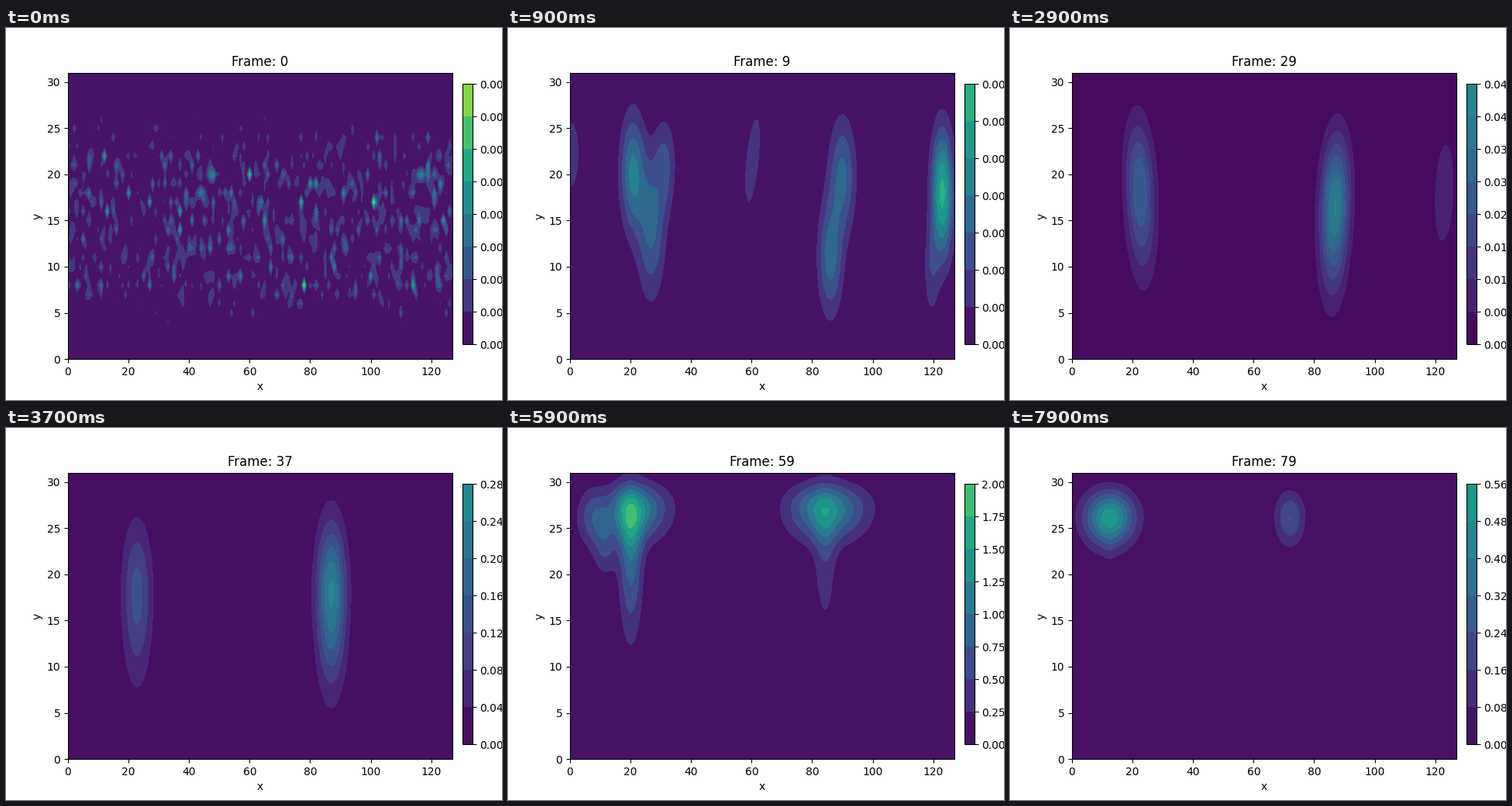
A matplotlib script for the animation above (8 s loop, 640 by 480 pixels).

```python
import matplotlib.pyplot as plt
import numpy as np
from matplotlib.animation import FuncAnimation

NX, NY, FRAMES = 128, 32, 80
STAGES = 9, 21, 37, 46, 59, 79
X, Y = np.meshgrid(np.arange(NX), np.arange(NY))
KX, KY = np.meshgrid(np.fft.fftfreq(NX), np.fft.fftfreq(NY))

# White noise held inside a central band of y
rng = np.random.default_rng(4)
BAND = np.exp(-((Y - 15.2) / 11.5) ** 4)
SPECTRUM = np.fft.fft2(rng.normal(size=(NY, NX)) * BAND)


def ramp(t, start, end):
    return np.clip((t - start) / (end - start), 0, 1)


def smooth(u):
    return u * u * (3 - 2 * u)


def level(t, values, stages=STAGES):
    """Exponential growth or decay between stages."""
    return np.exp(np.interp(t, stages, np.log(values)))


def bump(x, y, sx, up, down, lean=0, skew=0):
    """Gaussian lobe with its own height above and below the centre."""
    dy = Y - y
    dx = X - x - lean * dy
    wx = sx * (1 + skew * np.sign(dx))
    wy = np.where(dy > 0, up, down)
    return np.exp(-0.5 * ((dx / wx) ** 2 + (dy / wy) ** 2))


def noise(n):
    sx, sy = 0.35 * n, 0.45 * n
    blur = np.exp(-2 * np.pi ** 2 * ((sx * KX) ** 2 + (sy * KY) ** 2))
    z = np.abs(np.fft.ifft2(SPECTRUM * blur).real) ** 1.7
    return 7.7e-4 * np.exp(-0.1 * n) * z / z.max()


def plume(t, x, y, shift, drift, lean, skew, stem, head, width):
    """A column that lengthens, then rises into a wide head and fades."""
    young = ramp(t, 9, 37) ** 0.7
    birth = ramp(t, 37, 46)
    late, fade = ramp(t, 46, 59), ramp(t, 59, 79)
    rise = smooth(birth)

    x = x + shift * young - 2.7 * late - drift * fade
    y = y + (18 - y) * young + 3.8 * rise + 1.7 * late
    column = bump(x, y,
                  2.75 + 0.6 * young - 0.2 * rise - 0.5 * late - 0.8 * fade,
                  4.3 + 0.9 * young - 1.2 * rise - 0.5 * late - 1.5 * fade,
                  4.3 + 2.2 * young + 1.3 * rise - late - 4.5 * fade,
                  lean * 4 * young * (1 - young))
    cap = bump(x, 25 + 2.2 * rise - fade, level(t, width, STAGES[3:]),
               1.75 + 0.15 * fade, 2.4 - 0.3 * fade,
               skew=skew * late * (1 - fade))
    return (level(t, stem) * column
            + birth ** 3 * level(t, head, STAGES[3:]) * cap)


def edge_plume(t):
    young = ramp(t, 9, 37)
    strength = level(t, (5.12e-4, 4.5e-3, 0.02, 1e-3), (9, 21, 37, 79))
    return strength * bump(123, 18, 2.45 + 0.8 * young, 4.7 + young,
                           4.9 + 0.6 * young, 0.25 * young * (1 - young) * 2)


def side_lobe(t):
    late, fade = ramp(t, 46, 59), ramp(t, 59, 79)
    shape = (0.7 * bump(8 - 4 * fade, 26.2, 3.9, 2.1, 2.2)
             + 0.44 * bump(11.6 - 4 * fade, 22.8, 2.6, 2.2, 2.2))
    return late * np.exp(-4.5 * fade) * shape


def weak_lobes(t):
    """Early companions that grow too slowly to last."""
    shape = (3.3 * bump(26.8, 14.6, 3.1, 4.8, 5.4)
             + 2.2 * bump(31.3, 21, 2.5, 3.5, 3.5)
             + 3.3 * bump(90, 19.8, 3, 4.3, 4.3)
             + 1.6 * bump(119.3, 9.5, 1.7, 3.6, 3.6)
             + 1.35 * bump(60.3, 21.5, 2.5, 5.8, 5.8, 0.3)
             + 1.4 * bump(0, 22.3, 3.3, 4.1, 4.4))
    return 8e-5 * np.exp(1.6 * ramp(t, 9, 29)) * shape


def field(n):
    t = n if n < 59 else 59 + 20 * ((n - 59) / 20) ** 2
    z = plume(t, 20.7, 20.2, 2.1, 7.6, -0.15, 0.25,
              stem=(3.4e-4, 6.45e-3, 0.138, 0.63, 0.95, 0.03),
              head=(1.47, 1.35, 0.536), width=(5.9, 6.4, 5.7))
    z += plume(t, 86, 11, 1, 12.3, 0.13, 0.05,
               stem=(2.8e-4, 7.15e-3, 0.25, 0.99, 0.45, 0.004),
               head=(1.72, 1.28, 0.244), width=(8.05, 8.7, 3.4))
    z += edge_plume(t) + side_lobe(t) + weak_lobes(t)
    w = smooth(ramp(n, 0, 9))
    return w * z + (1 - w) * noise(n)


def headroom(n):
    """Colour range as a multiple of the field's peak."""
    return np.interp(n, (0, *STAGES),
                     (1.19, 1.61, 2.33, 2.26, 1.29, 1.40, 1.79))


fig = plt.figure(figsize=(6.4, 4.8), dpi=100)


def draw(n):
    fig.clear()
    ax = fig.add_subplot()
    z = field(n)
    cs = ax.contourf(X, Y, z, vmin=0, vmax=headroom(n) * z.max())
    ax.set(xlabel="x", ylabel="y", title=f"Frame: {n}")
    cax = fig.add_axes([0.92, 0.15, 0.02, 0.7])
    fig.colorbar(cs, cax=cax, label="Rain Processes")
    return []


anim = FuncAnimation(fig, draw, frames=FRAMES, interval=100, repeat=True,
                     repeat_delay=0)
plt.show()
```
